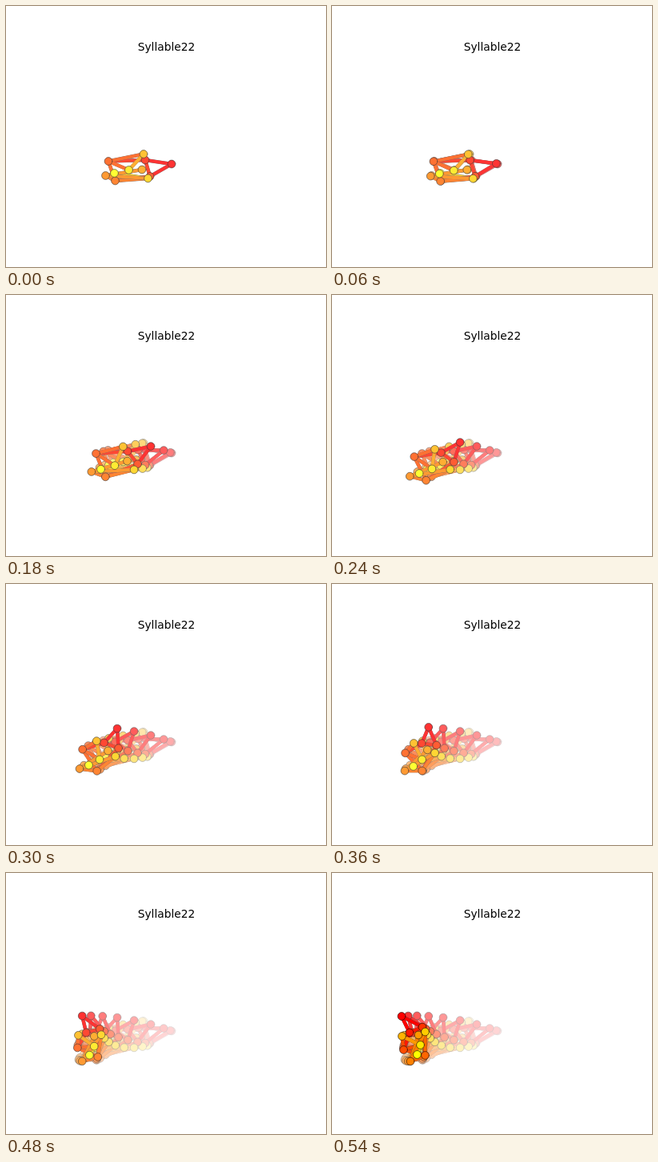
An HTML page with a canvas for the animation above (600 ms loop, 400 by 327 pixels).

```html
<!DOCTYPE html>
<html lang="en">
<head>
<meta charset="utf-8">
<title>Syllable22</title>
<style>
  html, body { margin: 0; width: 100%; height: 100%; overflow: hidden; background: #fff; }
  canvas { display: block; }
</style>
</head>
<body>
<canvas id="stage" width="400" height="327"></canvas>
<script>
const ctx = document.getElementById('stage').getContext('2d');
const STEP = 60, LAST = 9, FADE = 0.2;

// Each joint follows a quadratic Bézier curve: start, control, end.
const joints = {
  nose:      [[207, 198], [146, 175.5], [87, 179.5]],
  leftEar:   [[174, 193], [119, 200.5], [97, 200]],
  rightEar:  [[180, 213.5], [143, 211], [113, 193]],
  leftHip:   [[128, 194.5], [87, 203], [89.5, 221.5]],
  rightHip:  [[136.5, 219], [103, 244], [116.5, 228.5]],
  tail:      [[124.5, 212.5], [75.5, 236], [98, 236]],
  neck:      [[170, 205], [123.5, 214.5], [108, 203]],
  leftPaw:   [[172, 185.5], [107, 196], [87.5, 204.5]],
  rightPaw:  [[177.5, 216], [134, 227], [116.5, 199]],
  back:      [[153.5, 205.5], [107, 228.5], [110.5, 215.5]],
  rump:      [[135.5, 209.5], [89, 233.5], [106.5, 227.5]]
};
const names = Object.keys(joints);

// Bones grouped by the joint whose colour they share, in drawing order.
const bones = [
  ['rightPaw', 'rump rightPaw'],
  ['nose', 'nose leftEar', 'nose rightEar'],
  ['leftEar', 'leftEar rightEar', 'leftEar leftHip'],
  ['rightEar', 'rightEar rightHip'],
  ['leftHip', 'leftHip rightHip', 'leftHip leftPaw', 'leftHip back'],
  ['rightHip', 'rightHip tail', 'rightHip rightPaw'],
  ['tail', 'tail neck', 'tail rightPaw'],
  ['neck', 'leftPaw back']
];

const color = name => `rgb(255,${Math.round(names.indexOf(name) * 25.5)},0)`;

// Slow start, quick middle, long settling.
function progress(step) {
  const w = (step / LAST) ** 2.7;
  return w / (w + 0.2 * (1 - w));
}

function position([start, control, end], p) {
  const q = 1 - p;
  return [0, 1].map(k => q * q * start[k] + 2 * p * q * control[k] + p * p * end[k]);
}

function drawBone(from, to, style) {
  ctx.beginPath();
  ctx.moveTo(...from);
  ctx.lineTo(...to);
  ctx.lineWidth = 4.5;
  ctx.strokeStyle = '#444';
  ctx.stroke();
  ctx.lineWidth = 4.2;
  ctx.strokeStyle = style;
  ctx.stroke();
}

function drawJoint([x, y], style) {
  ctx.beginPath();
  ctx.arc(x, y, 4.9, 0, 2 * Math.PI);
  ctx.fillStyle = style;
  ctx.fill();
  ctx.lineWidth = 0.6;
  ctx.strokeStyle = '#000';
  ctx.stroke();
}

function drawPose(step) {
  const p = progress(step), pose = {};
  for (const name of names) pose[name] = position(joints[name], p);
  for (const [owner, ...pairs] of bones) {
    for (const pair of pairs) {
      const [from, to] = pair.split(' ');
      drawBone(pose[from], pose[to], color(owner));
    }
  }
  for (const name of names) drawJoint(pose[name], color(name));
}

function veil(alpha) {
  ctx.fillStyle = `rgba(255,255,255,${alpha})`;
  ctx.fillRect(0, 0, 400, 327);
}

function render(now) {
  const current = Math.floor(now / STEP) % (LAST + 1);
  veil(1);
  for (let step = 0; step <= current; step++) {
    drawPose(step);
    if (step < LAST) veil(FADE);
  }
  ctx.fillStyle = '#000';
  ctx.font = '13.8px "DejaVu Sans", sans-serif';
  ctx.textAlign = 'center';
  ctx.fillText('Syllable22', 200.5, 56);
  requestAnimationFrame(render);
}
ctx.lineCap = 'round';
render(performance.now());
</script>
</body>
</html>
```
